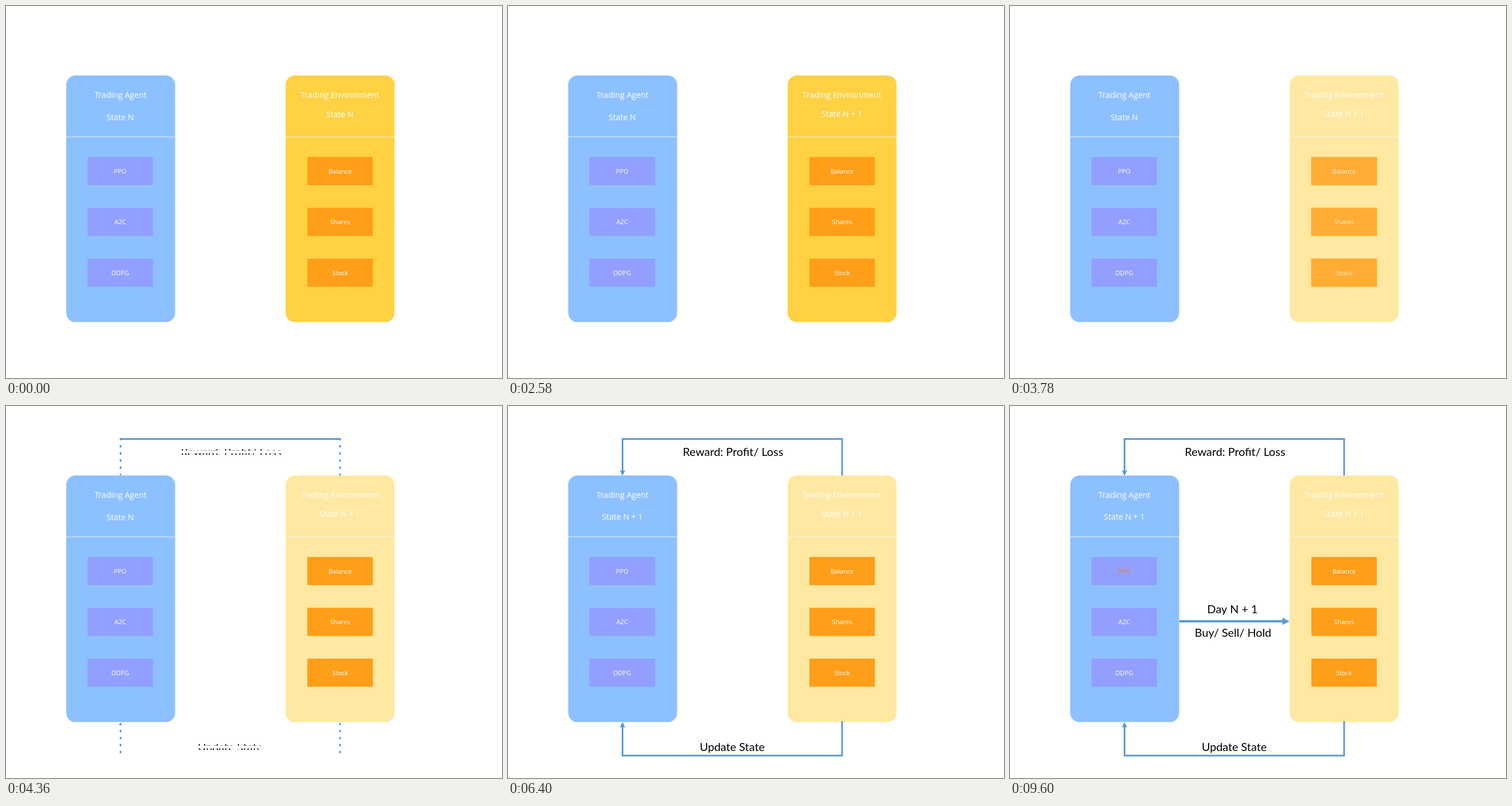
These frames come from a looping animation (864x648 px, 9.98 s). An HTML page with a canvas:

```html
<!DOCTYPE html>
<html lang="en">
<head>
<meta charset="utf-8">
<title>Trading agent loop</title>
<style>
  html, body { margin: 0; width: 100%; height: 100%; overflow: hidden; background: #fff; }
  canvas { display: block; }
</style>
</head>
<body>
<canvas id="stage" width="864" height="648"></canvas>
<script>
const LOOP = 9980, STEP = 40;
const ARROW = '#5b9bd5';
const TITLE = '14.1px "Open Sans", sans-serif';
const SMALL = '500 11.1px "Open Sans", sans-serif';
const NOTE = '19.8px Lato, sans-serif';
const ctx = document.getElementById('stage').getContext('2d');
const clamp = v => Math.min(1, Math.max(0, v));

// Progress of an effect that advances in fixed steps, the first one at its start.
const progress = (t, start, steps = 12) => clamp((Math.floor((t - start) / STEP) + 1) / steps);

function text(str, x, y, font, color) {
  ctx.font = font;
  ctx.fillStyle = color;
  ctx.textAlign = 'center';
  ctx.fillText(str, x, y);
}

// Horizontal blinds: six strips, each showing the part between closed and opened.
function blinds(top, pitch, opened, closed, draw) {
  if (opened <= closed) return;
  ctx.save();
  if (opened < 1 || closed > 0) {
    ctx.beginPath();
    for (let i = 0; i < 6; i++)
      ctx.rect(0, top + (i + closed) * pitch, 864, (opened - closed) * pitch);
    ctx.clip();
  }
  draw();
  ctx.restore();
}

function note(str, x, y, opened, closed = 0) {
  blinds(y - 27, 7.5, opened, closed, () => text(str, x, y, NOTE, '#000'));
}

function state(str, x, y, opened, closed) {
  blinds(y - 19, 5, opened, closed, () => text(str, x, y, TITLE, '#fff'));
}

function panel(x, color, title) {
  ctx.fillStyle = color;
  ctx.beginPath();
  ctx.roundRect(x, 121, 189.6, 429.6, 16);
  ctx.fill();
  ctx.fillStyle = 'rgba(255,255,255,.75)';
  ctx.fillRect(x, 227.5, 189.6, 1);
  text(title, x + 94.4, 160, TITLE, '#fff');
}

// Three labelled boxes that dim to half and grow by 5% while pulsing.
function boxes(x, color, labels, pulse, firstColor = '#fff') {
  const scale = 1 + .05 * (1 - Math.abs(2 * pulse - 1));
  labels.forEach((label, i) => {
    ctx.save();
    ctx.globalAlpha = 1 - .5 * Math.min(1, pulse / .2, (1 - pulse) / .2);
    ctx.translate(x, 287.5 + i * 88.5);
    ctx.scale(scale, scale);
    ctx.fillStyle = color;
    ctx.fillRect(-57, -24.5, 114, 49);
    text(label, 0, 4, SMALL, i ? '#fff' : firstColor);
    ctx.restore();
  });
}

function arrow(points, width, head) {
  ctx.strokeStyle = ctx.fillStyle = ARROW;
  ctx.lineWidth = width;
  ctx.beginPath();
  points.forEach(p => ctx.lineTo(...p));
  ctx.stroke();
  ctx.beginPath();
  head.forEach(p => ctx.lineTo(...p));
  ctx.fill();
}

function action(day, y, opened, closed) {
  note(day, day === 'Day N' ? 385.5 : 387.5, y, opened, closed);
  note('Buy/ Sell/ Hold', 388.5, 402, opened, closed);
  blinds(368.5, 2.1, opened, closed, () =>
    arrow([[295, 375], [476, 375]], 4, [[474.5, 368.7], [487, 375], [474.5, 381.3]]));
}

function feedback(opened) {
  note('Reward: Profit/ Loss', 392, 87, opened);
  note('Update State', 390.5, 601, opened);
  blinds(55.7, 12.4, opened, 0, () =>
    arrow([[582, 121], [582, 57.5], [199.5, 57.5], [199.5, 114]], 3,
      [[194.8, 112.5], [199.5, 121.5], [204.2, 112.5]]));
  blinds(552, 12.2, opened, 0, () =>
    arrow([[582, 549], [582, 609], [199.5, 609], [199.5, 558]], 3,
      [[194.8, 559.5], [199.5, 550.5], [204.2, 559.5]]));
}

function draw(t) {
  ctx.fillStyle = '#fff';
  ctx.fillRect(0, 0, 864, 648);

  panel(105, '#8dc0ff', 'Trading Agent');
  const agent = progress(t, 5100);
  state('State N', 199, 199, 1, agent);
  state('State N + 1', 199, 198, agent, 0);
  const k = clamp((t - 6820) / 1920);
  const tint = `rgb(${255 - 18 * k},${255 - 130 * k},${255 - 206 * k})`;
  boxes(199, '#929fff', ['PPO', 'A2C', 'DDPG'], progress(t, 5960), tint);

  panel(487.2, t < 2960 ? '#ffd143' : '#ffe8a1', 'Trading Environment');
  const market = progress(t, 1280, 13);
  state('State N', 581.5, 194, 1, market);
  state('State N + 1', 581.5, 193, market, 0);
  boxes(582, '#ff9e18', ['Balance', 'Shares', 'Stock'], progress(t, 3380));

  action('Day N', 362, progress(t, 420), progress(t, 2140));
  feedback(progress(t, 4240));
  action('Day N + 1', 361, progress(t, 9160), 0);
}

const begin = performance.now();
function tick() {
  draw((performance.now() - begin) % LOOP);
  requestAnimationFrame(tick);
}
tick();
</script>
</body>
</html>
```
